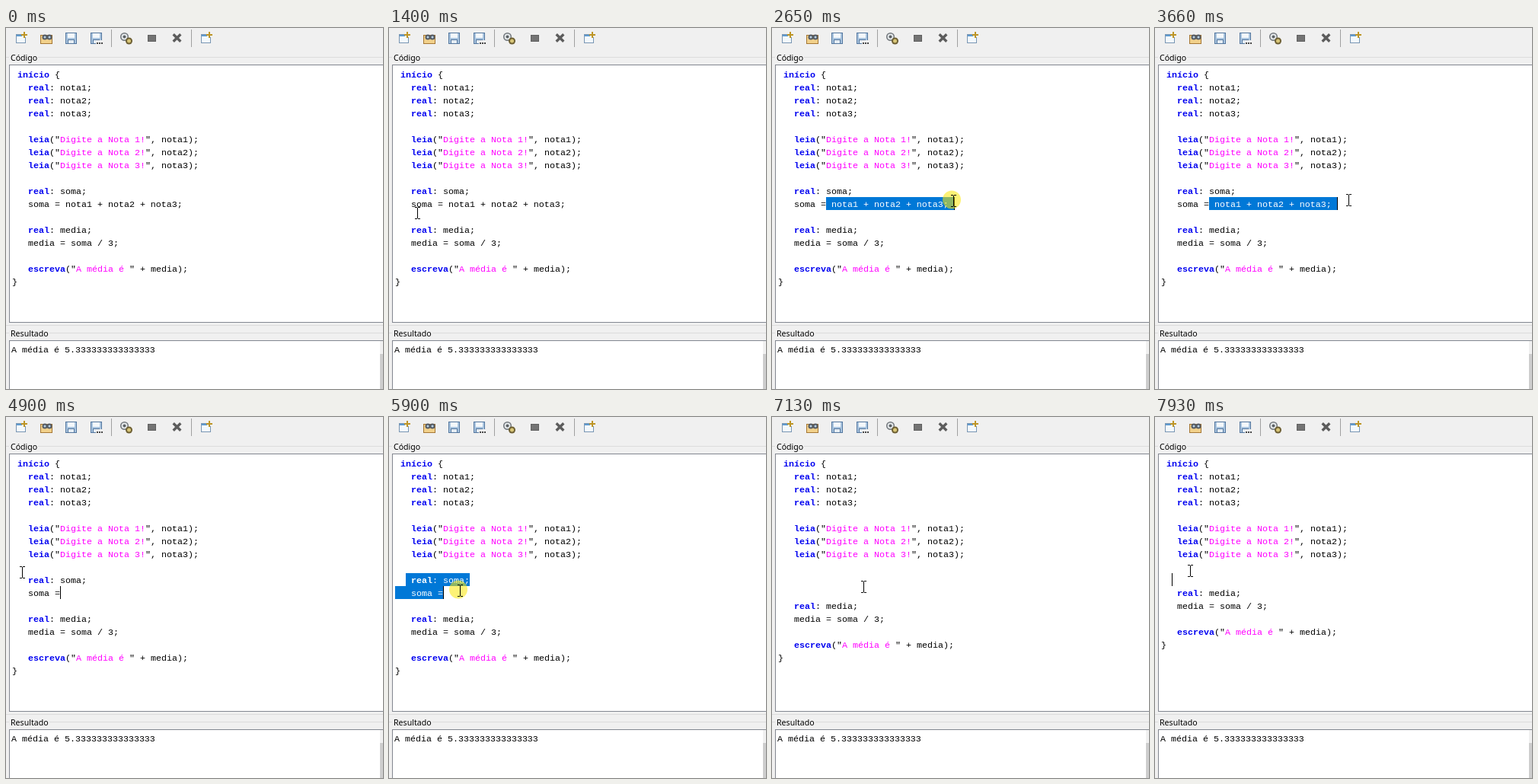
Animation, 495 px wide and 474 px high, one loop 8000 ms. Source, as an HTML page with a canvas:

```html
<!DOCTYPE html>
<html lang="pt">
<head>
<meta charset="utf-8">
<style>
html, body { margin: 0; width: 100%; height: 100%; overflow: hidden; background: #f0f0f0; }
canvas { display: block; }
</style>
</head>
<body>
<canvas id="stage" width="495" height="474"></canvas>
<script>
const ctx = document.getElementById('stage').getContext('2d');
const LOOP = 8000, STEP = 77, BLINK = 460;
const LEFT = 8, TOP = 52, CW = 7, LH = 17;
const MONO = '11.667px "Liberation Mono", monospace';
const TOKENS = /(início|real|leia|escreva|(?<=")[^"]+(?="))/;
const KEYWORDS = ['início', 'real', 'leia', 'escreva'];

const each = make => [1, 2, 3].map(make);
const CODE = [
  ' início {', ...each(n => `   real: nota${n};`), '',
  ...each(n => `   leia("Digite a Nota ${n}!", nota${n});`), '',
  '   real: soma;', '   soma = nota1 + nota2 + nota3; ', '',
  '   real: media;', '   media = soma / 3;', '',
  '   escreva("A média é " + media);', '}'
];

// script of the session, in ms
const CUT_SUM = 4520, CUT_LINES = 6670, CUT_BLANK = 7590;
const DRAG_SUM = { from: 2250, rest: 2740, to: 3200 };
const DRAG_LINES = { from: 5360, rest: 5980, to: 6210 };
const DRAGS = [DRAG_SUM, DRAG_LINES];
const CARET_RESTS = [DRAG_SUM.rest, CUT_SUM, DRAG_LINES.rest, CUT_LINES, CUT_BLANK];

const ENTRY = { x: 420, y: 445 };
const MOVES = [
  { from: 150, to: 770, x: 37, y: 220 },
  { from: 1170, to: 1400, x: 37, y: 243 },
  { from: 1477, to: 2100, x: 74, y: 232 },
  { from: 2250, to: 2650, x: 238, y: 227 },
  { from: 2725, to: 2800, x: 254, y: 226 },
  { from: 4520, to: 4900, x: 21, y: 204 },
  { from: 4975, to: 5050, x: 22, y: 210 },
  { from: 5360, to: 6130, x: 105, y: 231 },
  { from: 6900, to: 7210, x: 122, y: 222 },
  { from: 7740, to: 7930, x: 46, y: 202 }
];

const easeOut = p => 1 - (1 - p) ** 1.5;
const rowTop = row => TOP + row * LH;

function box(x, y, w, h, color) {
  ctx.fillStyle = color;
  ctx.fillRect(x, y, w, h);
}

function frame(x, y, w, h, edge, fill) {
  box(x, y, w, h, edge);
  box(x + 1, y + 1, w - 2, h - 2, fill);
}

function disc(x, y, r, color) {
  ctx.fillStyle = color;
  ctx.beginPath();
  ctx.arc(x, y, r, 0, Math.PI * 2);
  ctx.fill();
}

function write(text, x, y, font, color = '#000') {
  ctx.font = font;
  ctx.fillStyle = color;
  ctx.fillText(text, x, y);
}

function windowIcon(x) {
  frame(x, 8, 13, 12, '#7895b2', '#f3f9fd');
  box(x + 1, 9, 11, 2, '#5f9bd0');
  box(x + 8, 7, 7, 5, '#f0f0f0');
  box(x + 10, 5, 2, 8, '#bd9526');
  box(x + 7, 8, 8, 2, '#bd9526');
}

function folderIcon() {
  frame(45, 9, 16, 12, '#a57735', '#f2d18b');
  for (const x of [51, 57]) {
    disc(x, 12, 3.5, '#555b63');
    disc(x, 12, 1.5, '#b9d2e6');
  }
}

function diskIcon(x) {
  frame(x, 6, 15, 15, '#54779f', '#a9c4df');
  box(x + 3, 7, 9, 6, '#f4f8fb');
  frame(x + 3, 15, 9, 6, '#54779f', '#e5edf4');
}

function runIcon() {
  disc(155.5, 11.5, 5.5, '#70757a');
  disc(155.5, 11.5, 4, '#e4e8ea');
  disc(155.5, 11.5, 2, '#5d6266');
  disc(161.5, 17, 4.5, '#6d5f33');
  disc(161.5, 17, 2.5, '#d8c678');
}

function crossIcon(x, y, r) {
  ctx.strokeStyle = '#5c5c5c';
  ctx.lineWidth = 3.4;
  ctx.beginPath();
  for (const side of [-1, 1]) {
    ctx.moveTo(x - r * side, y - r);
    ctx.lineTo(x + r * side, y + r);
  }
  ctx.stroke();
}

function toolbar() {
  [13, 256].forEach(windowIcon);
  folderIcon();
  [78, 111].forEach(diskIcon);
  box(118, 16, 9, 6, '#f0f0f0');
  for (let i = 0; i < 3; i++) box(119 + i * 3, 19, 2, 2, '#444');
  for (const x of [138, 243]) box(x, 2, 1, 23, '#a0a0a0');
  runIcon();
  frame(186, 9, 11, 9, '#606060', '#737373');
  crossIcon(224.5, 13, 4.8);
}

function panel(title, titleWidth, base, top, bottom) {
  const lineX = 8 + titleWidth;
  box(0, base - 5, 4, 1, '#dcdcdc');
  box(lineX, base - 5, 495 - lineX, 1, '#dcdcdc');
  box(0, bottom + 3, 495, 1, '#dcdcdc');
  write(title, 6, base, '10.6px "Noto Sans", sans-serif');
  frame(4, top, 500, bottom - top, '#828790', '#fff');
}

function drawWindow() {
  box(0, 0, 495, 474, '#f0f0f0');
  toolbar();
  panel('Código', 34, 43, 48, 387);
  panel('Resultado', 49, 405, 410, 480);
  box(491, 411, 4, 63, '#f0f0f0');
  box(491, 428, 4, 46, '#cdcdcd');
  write('A média é 5.333333333333333', 7, 426, MONO);
}

function codeAt(t) {
  const lines = CODE.slice();
  if (t >= CUT_SUM) lines[10] = '   soma =';
  if (t >= CUT_LINES) lines.splice(9, 2, '  ');
  if (t >= CUT_BLANK) lines.splice(10, 1);
  return lines;
}

function drawLine(text, row, color) {
  let col = 0;
  text.split(TOKENS).forEach((part, i) => {
    const key = KEYWORDS.includes(part);
    const ink = color || (key ? '#0000f0' : i % 2 ? '#ff00ff' : '#000');
    write(part, LEFT + col * CW, rowTop(row) + 13, (key ? 'bold ' : '') + MONO, ink);
    col += part.length;
  });
}

function select(lines, row, from, to) {
  const x = LEFT + from * CW, w = Math.max(0, to - from) * CW;
  ctx.save();
  ctx.beginPath();
  ctx.rect(x, rowTop(row), w, LH);
  ctx.clip();
  box(x, rowTop(row), w, LH, '#0078d7');
  drawLine(lines[row], row, '#fff');
  ctx.restore();
}

function pointerAt(t) {
  let { x, y } = ENTRY;
  for (const m of MOVES) {
    if (t < m.from) break;
    const steps = Math.round((m.to - m.from) / STEP) + 1;
    const step = Math.floor((t - m.from) / STEP + 0.1) + 1;
    const p = t >= m.to ? 1 : easeOut(Math.min(1, step / steps));
    x += (m.x - x) * p;
    y += (m.y - y) * p;
  }
  return { x: Math.round(x), y: Math.round(y) };
}

function caretAt(t, lines) {
  if (t >= CUT_LINES) return { row: 9, col: 2 };
  if (t >= CUT_SUM && t < DRAG_LINES.from) return { row: 10, col: 9 };
  const p = pointerAt(Math.min(t, t < CUT_SUM ? DRAG_SUM.to : DRAG_LINES.to));
  const row = t < CUT_SUM || p.y >= rowTop(10) ? 10 : 9;
  const col = Math.round((p.x - LEFT) / CW);
  return { row, col: Math.min(lines[row].length, col) };
}

function caretVisible(t) {
  if (DRAGS.some(d => t >= d.from && t < d.rest)) return true;
  const rest = CARET_RESTS.filter(r => r <= t).pop();
  return rest !== undefined && Math.floor((t - rest) / BLINK) % 2 === 0;
}

function drawSelection(t, lines) {
  const { row, col } = caretAt(t, lines);
  if (t >= DRAG_SUM.from && t < CUT_SUM) select(lines, 10, 9, col);
  if (t >= DRAG_LINES.from && t < CUT_LINES) {
    select(lines, 9, 2, row === 9 ? col : lines[9].length);
    if (row === 10) select(lines, 10, 0, col);
  }
  if (caretVisible(t)) box(LEFT + col * CW, rowTop(row), 1, LH, '#000');
}

function drawPointer(t) {
  if (t < MOVES[0].from) return;
  const { x, y } = pointerAt(t);
  if (DRAGS.some(d => t >= d.from && t < d.to))
    disc(x - 2, y - 1.5, 12, 'rgba(252,232,10,0.56)');
  for (const end of [y - 8, y + 7]) {
    box(x - 3, end, 3, 1, '#000');
    box(x + 1, end, 3, 1, '#000');
  }
  box(x, y - 7, 1, 14, '#000');
}

function draw(t) {
  const lines = codeAt(t);
  drawWindow();
  lines.forEach((text, row) => drawLine(text, row));
  drawSelection(t, lines);
  drawPointer(t);
}

const start = performance.now();
function tick() {
  draw((performance.now() - start) % LOOP);
  requestAnimationFrame(tick);
}
tick();
</script>
</body>
</html>
```
